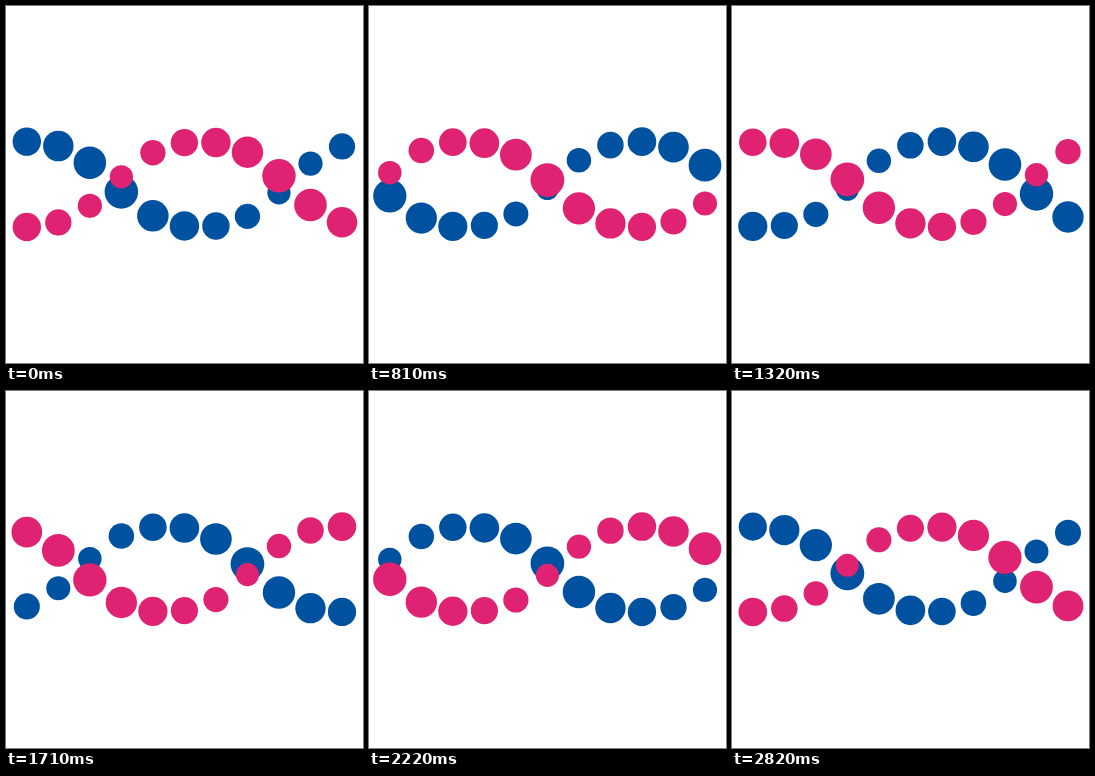
An HTML page with a canvas for the animation above (2.85 s loop, 357 px wide and 357 px high).

```html
<!DOCTYPE html>
<html lang="en">
<head>
<meta charset="utf-8">
<title>Double helix</title>
<style>
  html, body { margin: 0; width: 100%; height: 100%; overflow: hidden; background: #fff; }
  canvas { display: block; }
</style>
</head>
<body>
<canvas id="stage" width="357" height="357"></canvas>
<script>
const ctx = document.getElementById('stage').getContext('2d');
const LOOP = 2850, STEP = 30, LAG = 258, COLUMNS = 11;

// Triangle wave: -1 at whole turns, 1 at half turns
const tri = turn => 1 - 4 * Math.abs(turn - Math.floor(turn) - 0.5);

// cubic-bezier(.5, 0, .5, 1) in closed form, mapping -1..1 to -1..1
function ease(x) {
  const w = Math.sinh(Math.asinh(2 * x) / 3);
  return 3 * w - 4 * w ** 3;
}

function strand(time, shift, color) {
  ctx.fillStyle = color;
  for (let i = 0; i < COLUMNS; i++) {
    const turn = (time + 2 + LAG * i) / LOOP + shift;
    const y = 178.3 + 42.7 * ease(tri(turn));
    const radius = 14.2 * (1 + 0.2 * tri(turn + 0.25));
    ctx.beginPath();
    ctx.arc(20.8 + 31.52 * i, y, radius, 0, 2 * Math.PI);
    ctx.fill();
  }
}

const start = performance.now();

function draw() {
  const elapsed = (performance.now() - start) % LOOP;
  const time = Math.floor(elapsed / STEP) * STEP;
  ctx.fillStyle = '#fff';
  ctx.fillRect(0, 0, 357, 357);
  strand(time, 0, '#0052a0');
  strand(time, 0.5, '#e02272');
  requestAnimationFrame(draw);
}
draw();
</script>
</body>
</html>
```
